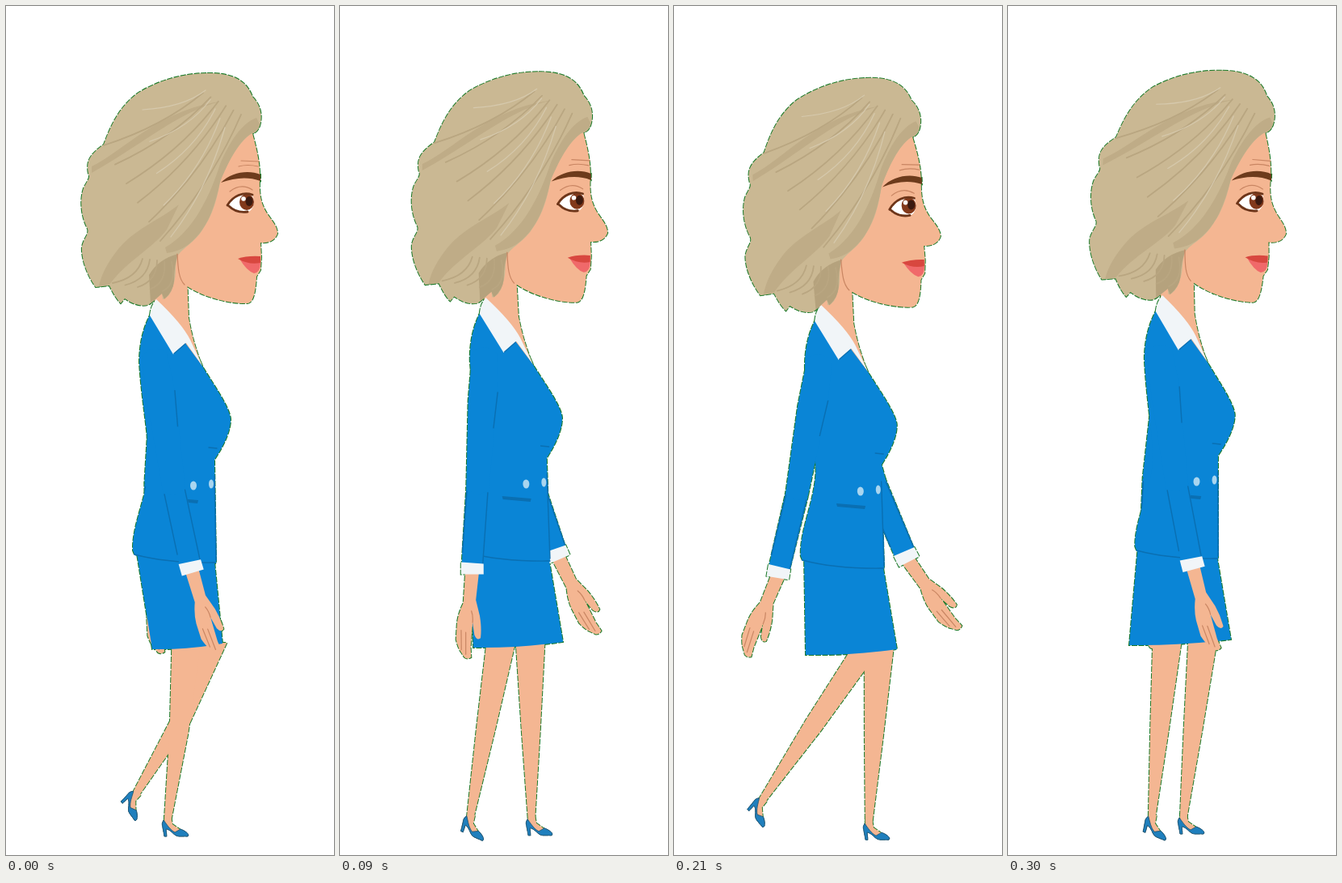
Recreate the animation shown at these times as an HTML page. Size 406 px wide and 1048 px high, loop 0.33 s.

```html
<!DOCTYPE html>
<html lang="en">
<head>
<meta charset="utf-8">
<title>Walk cycle</title>
<style>
  html, body { margin: 0; width: 100%; height: 100%; overflow: hidden; background: #fff; }
  svg { display: block; width: 100%; height: 100%; }
  .skin { fill: #f4b692; }
  .blue { fill: #0a85d6; }
  .white { fill: #f1f5f8; }
  .line { fill: none; stroke-linecap: round; }
  .seam { stroke: #0a6fb2; stroke-width: 1.4; }
  .crease { stroke: #c98663; stroke-width: 1.2; }
  .dark { stroke: #b9a681; stroke-width: 1.8; }
  .light { stroke: #d6c9ad; stroke-width: 1.2; }
</style>
</head>
<body>
<svg viewBox="0 0 406 1048">
  <defs>
    <g id="hand">
      <path class="skin" d="M-8-4L-6 38Q-11 52-11 64L-10 84Q-6 95-2 99L3 105Q7 107 11 104L9 92 8 61 12 76Q16 83 20 79 20 66 16 52L9 33 9-4Z"/>
      <path class="line crease" d="M-5 72L-2 96M1 74L4 101M8 61Q8 53 5 47"/>
    </g>
    <g id="shoe">
      <path class="skin" d="M-4-6L4-6 6 4 16 11 10 15-3 6Z"/>
      <path d="M-5-1Q-8 3-6 8L-4 19-1 19-2 10C4 10 8 19 14 19L25 19C28 16 21 12 16 10L9 14C3 11-1 4-5-1Z" fill="#1f7fbd" stroke="#24566f" stroke-width=".8"/>
    </g>
    <g id="upper">
      <path class="blue" d="M-15 0Q0-14 16 0L19 48 14 168Q0 182-14 168L-17 60Z"/>
      <path class="line seam" d="M19 48L16 92"/>
    </g>
    <g id="fore">
      <path class="blue" d="M-14 0L14 0 13 94-13 94Z"/>
      <path class="line seam" d="M13 4L13 92M-13 4L-13 80"/>
      <path class="white" d="M-14 92L14 92 15 105-13 107Z"/>
    </g>
  </defs>
  <use href="#figure" stroke="#1c7a29" stroke-width="2" stroke-dasharray="7 1.5"/>
  <g id="figure">
    <g id="farArm"></g>
    <path id="backLeg" class="skin"/>
    <path id="frontLeg" class="skin"/>
    <use id="backShoe" href="#shoe"/>
    <use id="frontShoe" href="#shoe"/>
    <path id="skirt" class="blue"/>
    <g id="torso">
      <path class="skin" d="M184 330L224 330 226 385Q231 415 243 445L205 425 184 372Z"/>
      <path class="blue" d="M180 378Q165 405 165 440C168 490 177 530 177 568C175 605 156 640 157 672L159 677Q200 688 260 688L258 560Q278 530 278 510C277 495 255 465 242 443L222 416 207 430Z"/>
      <path class="white" d="M186 362Q218 392 228 412L243 444 223 416 207 430 178 382Q179 370 186 362Z"/>
      <path class="line seam" d="M159 677Q200 688 260 687" stroke-width="2"/>
      <path class="line seam" d="M258 580L260 684M251 545L261 546M208 429L222 417"/>
      <path d="M202 607L238 610 237 614 203 611Z" fill="#0a6fb2"/>
      <g fill="#a9d5ef"><ellipse cx="232" cy="592" rx="4" ry="5.5"/><ellipse cx="254" cy="590" rx="3" ry="5.5"/></g>
    </g>
    <g id="nearArm"></g>
    <g id="head">
      <path class="skin" d="M304 150C311 175 316 195 315 215C314 236 318 246 324 256C330 265 337 272 337 281C334 290 325 293 316 292L317 310 316 326 311 334C310 350 308 366 300 367C280 368 245 360 224 345L206 330 220 250 270 160Z"/>
      <path fill="#cab893" d="M250 83C285 82 300 95 306 112C316 122 319 135 315 148Q312 157 304 158C287 170 275 195 266 217C261 245 255 260 245 275C235 292 219 299 214 308C209 320 213 330 208 345Q204 360 195 362L194 355 185 363 177 369Q163 372 148 361L143 367Q136 360 129 345L112 347C100 330 94 310 95 297C98 285 104 282 102 275C94 260 92 240 97 225C102 215 106 212 103 207C100 192 104 184 122 171C130 150 140 125 165 107C190 92 220 83 250 83Z"/>
      <g fill="#bfac87">
        <path d="M311 138C292 145 278 168 266 195C252 240 230 280 198 298L200 305Q215 303 226 295C252 275 260 245 266 217C275 195 288 168 304 158Q313 155 315 146Z"/>
        <path d="M215 245C195 262 160 275 140 300Q120 325 116 346L129 344C150 315 184 298 200 276Z"/>
        <path d="M214 306Q190 312 178 332L180 367 194 355 197 362Q208 352 209 340 209 320 214 306Z" fill="#b5a27d"/>
        <path d="M107 198C145 180 190 128 266 118C215 130 165 174 107 206Z"/>
      </g>
      <g id="strands"></g>
      <path class="line crease" d="M213 306C214 325 215 337 222 344M292 191L314 192M289 198Q300 195 313 198M278 229Q292 218 306 227"/>
      <path fill="#6d3b1c" d="M267 218C280 205 301 202 316 208L316 216C300 210 284 212 267 218Z"/>
      <path fill="#fff" d="M277 245C283 235 295 231 306 233Q311 245 303 253C292 258 282 254 277 245Z"/>
      <ellipse cx="299" cy="242" rx="9" ry="10" fill="#82391b"/>
      <ellipse cx="302" cy="241" rx="4.5" ry="6" fill="#3b1a10"/>
      <circle cx="295" cy="238" r="2.8" fill="#fff"/>
      <path class="line" d="M275 246C282 234 295 229 306 233M277 247Q286 256 300 254" stroke="#6d3519" stroke-width="2.8"/>
      <path fill="#f0696a" d="M290 312L316 317Q316 329 308 330 299 327 290 312Z"/>
      <path fill="#d8473f" d="M288 312Q299 308 316 309L316 317Q302 320 288 312Z"/>
    </g>
  </g>
</svg>
<script>
const STEP = 30, STEPS = 11;
const el = id => document.getElementById(id);
const lerp = (a, b, k) => a + (b - a) * k;
const set = (id, attrs) => {
  for (const name in attrs) el(id).setAttribute(name, attrs[name]);
};

// near, back: arm swing; spread: half the distance between the hips;
// front, back: ankle x; lift: raised back heel; hem: left skirt corner
const stride = { at: 5, lean: -4, bob: 7, near: 1, far: -23, spread: 8, front: 241, back: 108, lift: 28, hem: 163 };
const poses = [
  { at: 0, lean: 0, bob: 0, near: -.9, far: 0, spread: -16, front: 200, back: 160, lift: 32, hem: 181 },
  { at: 1, lean: -5.5, bob: -4, near: .1, far: -16, spread: 18, front: 222, back: 170, lift: 0, hem: 152 },
  { at: 3, lean: -5.5, bob: -2, near: .3, far: -19, spread: 18, front: 237, back: 161, lift: 2, hem: 165 },
  stride,
  { ...stride, at: 7 },
  { at: 8, lean: 0, bob: 2, near: .75, far: -18, spread: -16, front: 213, back: 157, lift: 30, hem: 201 },
  { at: 10, lean: 5, bob: -5, near: -.8, far: 3, spread: 22, front: 217, back: 178, lift: 0, hem: 150 }
];

function poseAt(step) {
  const next = Math.max(1, poses.findIndex(p => p.at >= step));
  const a = poses[next - 1], b = poses[next];
  const k = (step - a.at) / (b.at - a.at);
  return Object.fromEntries(Object.keys(a).map(key => [key, lerp(a[key], b[key], k)]));
}

// Curves whose two ends slide along the lines a–b and c–d.
function fan(kind, count, a, b, c, d) {
  let path = '';
  for (let i = 0; i < count; i++) {
    const k = i / (count - 1);
    const x1 = lerp(a[0], b[0], k), y1 = lerp(a[1], b[1], k);
    const x2 = lerp(c[0], d[0], k), y2 = lerp(c[1], d[1], k);
    path += `M${x1} ${y1}Q${(x1 + x2) / 2 + 12} ${(y1 + y2) / 2 + 9} ${x2} ${y2}`;
  }
  el('strands').innerHTML += `<path class="line ${kind}" d="${path}"/>`;
}
fan('dark', 6, [245, 107], [292, 134], [122, 172], [192, 290]);
fan('light', 5, [248, 104], [272, 150], [170, 128], [205, 285]);
fan('dark', 5, [170, 312], [206, 316], [133, 342], [195, 352]);

for (const id of ['farArm', 'nearArm']) {
  el(id).innerHTML = ['hand', 'fore', 'upper']
    .map(part => `<use id="${id}-${part}" href="#${part}"/>`).join('');
}

function drawArm(id, x, y, upper, fore, hand) {
  const place = (part, angle, length) => {
    set(`${id}-${part}`, { transform: `translate(${x} ${y}) rotate(${angle})` });
    const r = angle * Math.PI / 180;
    x -= length * Math.sin(r);
    y += length * Math.cos(r);
  };
  place('upper', upper, 168);
  place('fore', fore, 104);
  place('hand', hand, 0);
}

function drawLeg(name, hipX, hipY, x, y, bend, turn) {
  const kneeX = (hipX + x) / 2 + bend, kneeY = (hipY + y) / 2;
  const length = Math.hypot(x - hipX, y - hipY);
  const nx = (y - hipY) / length, ny = (hipX - x) / length;
  const side = s => [
    [hipX + 18 * s, hipY],
    [kneeX + 11.5 * s * nx, kneeY + 11.5 * s * ny],
    [x + 4.2 * s * nx, y + 4.2 * s * ny]
  ];
  set(name + 'Leg', { d: `M${[...side(-1), ...side(1).reverse()].join('L')}Z` });
  set(name + 'Shoe', { transform: `translate(${x} ${y}) rotate(${turn})` });
}

function draw(step) {
  const { lean, bob, near, far, spread, front, back, lift, hem } = poseAt(step);
  const slope = lean / 323;
  const tilt = (Math.max(0, lean) - bob) / 4;
  set('torso', { transform: `matrix(1 0 ${-slope} 1 ${slope * 688} ${bob})` });
  set('head', { transform: `translate(${lean - 1} ${bob}) rotate(${tilt} 215 350)` });

  drawArm('nearArm', 183 + lean * .8, 430 + bob, 9.5 * near, 13.5 * near, 20 * near + 4 * near * near);
  drawArm('farArm', 200 + lean * .8, 422 + bob, far + 5, far, far * (.5 - far * .042));

  // Crossed legs bend the back knee and pull the skirt in.
  const crossed = Math.max(0, -spread);
  const right = 276 - crossed / 2;
  set('skirt', {
    d: `M161 ${670 + bob}L${hem} ${794 + bob}Q${(hem + right) / 2} ${795 + bob} ${right} ${787 + bob}L257 ${675 + bob}Z`
  });
  const hips = 221 + 1.15 * (196 - (front + back) / 2);
  const ground = 1006 + bob * .6;
  drawLeg('back', hips - spread, 786 + bob, back, ground - lift, crossed * .6, 22 + lift);
  drawLeg('front', hips + spread, 786 + bob, front, ground, crossed * .15, 0);
}

const start = performance.now();
function tick(now) {
  draw(Math.floor(Math.max(0, now - start) / STEP) % STEPS);
  requestAnimationFrame(tick);
}
draw(0);
requestAnimationFrame(tick);
</script>
</body>
</html>
```
